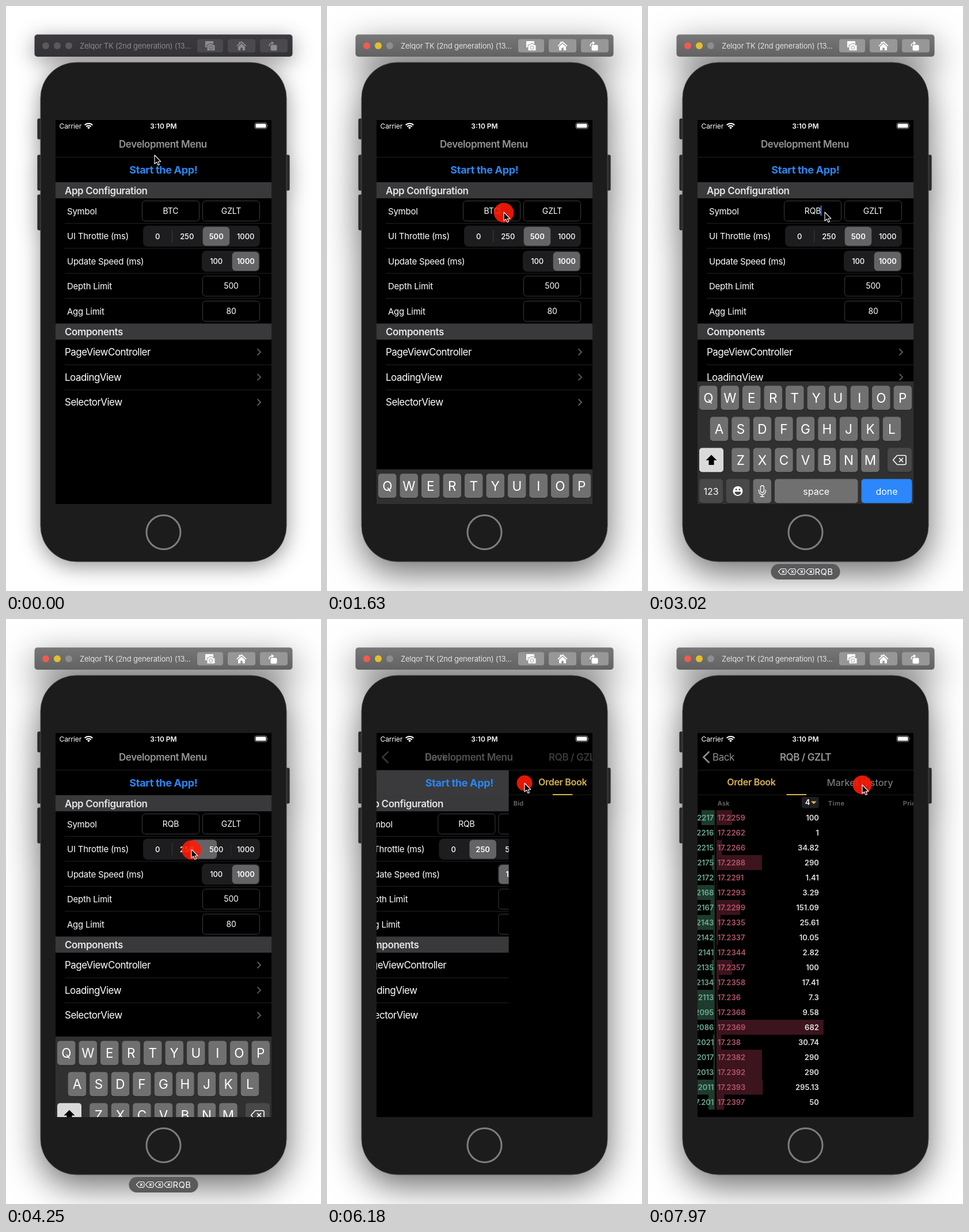
An HTML page for the animation above (8 s loop, 547 by 1016 pixels).

```html
<!DOCTYPE html>
<html lang="en">
<head>
<meta charset="utf-8">
<title>Development menu</title>
<style>
html, body { margin: 0; width: 100%; height: 100%; overflow: hidden; background: #fff; }
svg { display: block; }
#stage, #case { position: absolute; left: 0; top: 0; width: 547px; height: 1016px; }
text { font-family: Inter, Roboto, "Liberation Sans", sans-serif; white-space: pre; }
#case { --light1: #5b595c; --light2: #5b595c; --light3: #5b595c; --btn: #4b494d; --icon: #8d8c8e; --title: #8b8a8c; --bar: url(#barOff); }
#case .solid { filter: drop-shadow(0 8px 18px rgba(0,0,0,.42)); }
#case.on { --light1: #f15b51; --light2: #e3bf2f; --light3: #8d8d8d; --btn: #979797; --icon: #fff; --title: #e2e2e2; --bar: url(#barOn); }
#case.on .solid { filter: drop-shadow(0 19px 30px rgba(0,0,0,.58)); }
</style>
</head>
<body>
<svg id="case" viewBox="0 0 547 1016">
  <defs>
    <linearGradient id="barOff" x2="0" y2="1"><stop stop-color="#3c3a3f"/><stop offset="1" stop-color="#343237"/></linearGradient>
    <linearGradient id="barOn" x2="0" y2="1"><stop stop-color="#777"/><stop offset="1" stop-color="#626262"/></linearGradient>
  </defs>
  <g class="solid">
    <rect x="49.5" y="49.5" width="448" height="38.5" rx="5" style="fill:var(--bar)"/>
    <g fill="#2b2b2b" stroke="#1a1a1a">
      <rect x="55" y="196" width="9" height="35" rx="1.5"/>
      <rect x="55" y="259" width="9" height="61" rx="1.5"/>
      <rect x="55" y="328" width="9" height="61" rx="1.5"/>
      <rect x="483" y="259" width="9" height="61" rx="1.5"/>
    </g>
    <rect x="60" y="98" width="427" height="867" rx="62" fill="#1c1c1c" stroke="#484848"/>
  </g>
  <circle cx="273.5" cy="914" r="29.5" fill="none" stroke="#7d7d7d" stroke-width="3"/>
  <circle cx="69" cy="69" r="6" style="fill:var(--light1)"/>
  <circle cx="89" cy="69" r="6" style="fill:var(--light2)"/>
  <circle cx="109" cy="69" r="6" style="fill:var(--light3)"/>
  <text x="128" y="74" font-size="13" letter-spacing="-.2" style="fill:var(--title)">Zelqor TK (2nd generation) (13...</text>
  <g style="fill:var(--btn)">
    <rect x="332" y="57.5" width="45" height="23" rx="4"/>
    <rect x="385" y="57.5" width="48" height="23" rx="4"/>
    <rect x="441" y="57.5" width="48" height="23" rx="4"/>
  </g>
  <g style="fill:var(--icon);stroke:var(--btn)">
    <rect x="345.5" y="60.5" width="15" height="12" rx="1.5"/>
    <path d="M349 67.5h3l1.2-2h5l1.2 2h3.6v10.2h-14z"/>
    <circle cx="355.8" cy="72.3" r="3"/>
  </g>
  <g style="fill:var(--icon)">
    <path d="M409 61l8.5 8-1.2 1.3-7.3-6.8-7.3 6.8-1.2-1.3 4-3.8v-3h2v1.2z"/>
    <path d="M409 65.2l6 5.5V77h-4.2v-4.5h-3.6V77H403v-6.300z"/>
    <rect x="459.500" y="67.500" width="11" height="10" rx="2"/>
    <path d="M461 61l4.500 3.300-4.500 3.300z"/>
    <path d="M457 70c0-4 1.500-5.700 5-5.700" style="fill:none;stroke:var(--icon);stroke-width:1.600"/>
  </g>
</svg>
<svg id="stage" viewBox="0 0 547 1016"></svg>
<script>
const LOOP = 8000;
const COIN = 'RQB', CASH = 'GZLT';
const stage = document.getElementById('stage');
const shell = document.getElementById('case');

function add(parent, tag, attrs = {}) {
  const el = document.createElementNS('http://www.w3.org/2000/svg', tag);
  for (const k in attrs) el.setAttribute(k, attrs[k]);
  parent.appendChild(el);
  return el;
}
const group = (p, attrs) => add(p, 'g', attrs);
const path = (p, d, attrs) => add(p, 'path', { d, ...attrs });
const box = (p, x, y, width, height, fill, rx = 0, more) =>
  add(p, 'rect', { x, y, width, height, fill, rx, ...more });
// cy is the middle of the capitals
function label(p, x, cy, str, size, o = {}) {
  const el = add(p, 'text', {
    x, y: cy + size * 0.364, 'font-size': size, fill: o.fill || '#fff',
    'font-weight': o.weight || 400, 'text-anchor': o.anchor || 'start',
    'letter-spacing': o.ls || 0
  });
  el.textContent = str;
  return el;
}
const mid = { anchor: 'middle' };
const move = (el, x, y) => el.setAttribute('transform', `translate(${x} ${y})`);
const fade = (el, v) => el.setAttribute('opacity', v);
const show = (el, on) => el.setAttribute('visibility', on ? 'visible' : 'hidden');
const smooth = u => u * u * (3 - 2 * u);
const mix = (a, b, u) => a + (b - a) * u;

// value at t in a table of [time, value]
function at(t, rows, ease = u => u) {
  if (t <= rows[0][0]) return rows[0][1];
  for (let i = 1; i < rows.length; i++) {
    const [t0, a] = rows[i - 1], [t1, b] = rows[i];
    if (t < t1) return mix(a, b, ease((t - t0) / (t1 - t0)));
  }
  return rows[rows.length - 1][1];
}

const screen = add(stage, 'svg', { x: 86, y: 198, width: 375, height: 667, viewBox: '86 198 375 667' });
box(screen, 86, 198, 375, 667, '#000');

// ---- menu page
const menu = group(screen);
const line = (p, x, y, w = 461 - x, c = '#242426') => box(p, x, y, w, 1, c);
const press = box(menu, 86, 263, 375, 43, '#3a3a3c');
label(menu, 273.5, 284.5, 'Start the App!', 18, { ...mid, weight: 700, fill: '#2b87f3', ls: -0.3 });
for (const [y, s] of [[306, 'App Configuration'], [551.5, 'Components']]) {
  box(menu, 86, y, 375, 28, '#39393b');
  label(menu, 102, y + 14.5, s, 17, { weight: 600, fill: '#e4e4e6', ls: -0.43 });
}
['Symbol', 'UI Throttle (ms)', 'Update Speed (ms)', 'Depth Limit', 'Agg Limit'].forEach((s, i) => {
  label(menu, 106, 356.3 + i * 43.5, s, 15, { ls: -0.24 });
  if (i) line(menu, 102, 333.5 + i * 43.4);
});
['PageViewController', 'LoadingView', 'SelectorView'].forEach((s, i) => {
  const y = 601 + i * 43.6;
  label(menu, 102, y, s, 17, { ls: -0.53 });
  path(menu, `M436.500 ${y - 5.5}l5.500 5.500-5.500 5.500`, { fill: 'none', stroke: '#5a5a5e', 'stroke-width': 2 });
  if (i) line(menu, 102, y - 22);
});
function field(x, y, s) {
  box(menu, x + .5, y + .5, 99, 35, '#000', 5, { stroke: '#3c3c3f' });
  return label(menu, x + 50, y + 17.7, s, 14, { ...mid, ls: -0.15 });
}
const coin = field(236, 338, 'BTC');
field(341, 338, CASH);
field(341, 468.5, '500');
field(341, 512, '80');
const caret = box(menu, 0, 346.5, 2, 18, '#3478e5', 1);

function segments(x, y, names) {
  box(menu, x, y, 441 - x, 36.5, '#1d1d1f', 8);
  const rules = names.slice(1).map((_, i) => box(menu, x + 50.2 + i * 51, y + 7.5, 1, 21.5, '#414144'));
  const thumb = box(menu, 0, y + 2, 46.5, 33, '#646467', 6);
  const texts = names.map((s, i) => label(menu, x + 25.2 + i * 51, y + 18.5, s, 13, { ...mid, ls: -0.05 }));
  const pick = n => texts.forEach((el, i) => el.setAttribute('font-weight', i === n ? 600 : 500));
  return { rules, thumb, pick };
}
const throttle = segments(238, 381.5, ['0', '250', '500', '1000']);
const speed = segments(340, 425, ['100', '1000']);
show(throttle.rules[1], false);
show(speed.rules[0], false);

// ---- market page, laid out from its own left edge
const market = group(screen);
box(market, 0, 263, 375, 602, '#000');
const pages = group(add(market, 'svg', { x: 0, y: 306, width: 375, height: 559, viewBox: '0 306 375 559' }));
const head = { weight: 600, fill: '#6c6c6f', ls: 0.25 };
label(pages, 8, 319.5, 'Bid', 11, head);
label(pages, 191, 319.5, 'Ask', 11, head);
label(pages, 383, 319.5, 'Time', 11, { ...head, ls: 0.5 });
label(pages, 513, 319.5, 'Price', 11, head);
box(pages, 337, 309, 30, 19.5, '#1f1f21', 4);
label(pages, 343, 318.7, '4', 13, { weight: 600 });
path(pages, 'M353 316.500h10l-5 5z', { fill: '#d9b34c' });

const book = group(pages);
const bids = `2217 84.3 2216 1.2 2215 2.5 2175 18.4 2172 2.1 2168 290 2167 26.5 2143 143 2142 7.5 2141 7.2
 2135 19 2134 11 2113 203 2095 290 2086 1.5 2021 11.4 2017 7 2013 8.2 2011 290 201 40`.split(/\s+/);
const asks = `2259 100 2262 1 2266 34.82 2288 290 2291 1.41 2293 3.29 2299 151.09 2335 25.61 2337 10.05 2344 2.82
 2357 100 2358 17.41 236 7.3 2368 9.58 2369 682 238 30.74 2382 290 2392 290 2393 295.13 2397 50`.split(/\s+/);
for (let i = 0; i < 20; i++) {
  const y = 332 + i * 26, cy = y + 13;
  const [bp, bq] = bids.slice(i * 2), [ap, aq] = asks.slice(i * 2);
  const bw = Math.max(1, bq / 682 * 186), aw = Math.max(1, aq / 682 * 186);
  box(book, 186 - bw, y, bw, 26, '#1d3b2e');
  box(book, 189, y, aw, 26, '#3c141d');
  label(book, 8, cy, bq, 13, { weight: 600, fill: '#e2e2e2' });
  label(book, 184.5, cy, '17.' + bp, 13, { weight: 600, fill: '#6fae91', anchor: 'end' });
  label(book, 191, cy, '17.' + ap, 13, { weight: 600, fill: '#b4566a' });
  label(book, 367, cy, aq, 13, { weight: 600, fill: '#e2e2e2', anchor: 'end' });
}
const spokes = Array.from({ length: 8 }, (_, i) => box(pages, 186.2, 576, 2.6, 6.2, '#a0a0a4', 1.3,
  { transform: `rotate(${i * 45} 187.500 586)` }));
label(market, 93.5, 283, 'Order Book', 16, { ...mid, weight: 600, fill: '#dab54f', ls: -0.3 });
label(market, 282, 283.5, 'Market History', 16.5, { ...mid, weight: 500, fill: '#77777a', ls: -0.1 });
line(market, 0, 305, 375, '#1b1b1d');
const marker = box(market, 76, 304, 35, 2, '#dab54f', 1);

// ---- navigation and status bars
box(screen, 86, 198, 375, 64, '#000');
line(screen, 86, 262, 375, '#1e1e20');
const navTitle = { weight: 600, fill: '#949496', ls: -0.43 };
const oldTitle = label(screen, 196, 240, 'Development Menu', 17, navTitle);
const newTitle = label(screen, 273.5, 240, `${COIN} / ${CASH}`, 17, { ...navTitle, ...mid });
const backText = label(screen, 0, 240, 'Back', 17, { fill: '#8c8c8f', ls: -0.43 });
const backMark = path(screen, 'M105.500 231l-9 9 9 9', { fill: 'none', stroke: '#8c8c8f', 'stroke-width': 2.8, 'stroke-linecap': 'round' });
label(screen, 92.5, 208.500, 'Carrier', 12, { ls: -0.08 });
label(screen, 273.5, 208.5, '3:10 PM', 12, { ...mid, weight: 600 });
const wifi = group(screen, { fill: 'none', stroke: '#fff', 'stroke-width': 2 });
path(wifi, 'M136.700 206.800a9.500 9.500 0 0 1 13.600 0M139.200 209.500a6 6 0 0 1 8.600 0');
path(wifi, 'M143.500 213.800l-2.400-2.500a3.400 3.400 0 0 1 4.800 0z', { fill: '#fff', stroke: 'none' });
box(screen, 432, 203, 21, 10, 'none', 3, { stroke: '#8a8a8a' });
box(screen, 433.5, 204.500, 18, 7, '#fff', 1.6);
path(screen, 'M454.500 206.200q1.600 1.800 0 3.600z', { fill: '#8a8a8a' });

// ---- keyboard, laid out from its top edge
const keys = group(screen);
box(keys, 86, 0, 375, 216, '#303030');
function key(x, row, w, fill, s, size = 22.5, ink = '#fff') {
  const y = 7.5 + row * 54;
  box(keys, x, y + 1, w, 42, '#1a1a1a', 5);
  box(keys, x, y, w, 42, fill, 5);
  if (s) label(keys, x + w / 2, y + 21.3, s, size, { ...mid, fill: ink });
}
const LIGHT = '#707070', DARK = '#484848';
[['QWERTYUIOP', 89], ['ASDFGHJKL', 107.7], ['ZXCVBNM', 145.2]].forEach(([s, x], row) =>
  [...s].forEach((c, i) => key(x + i * 37.5, row, 31.5, LIGHT, c)));
key(89, 2, 42, '#dadada');
path(keys, 'M110 127.500l9.500 9.500h-5v8h-9v-8h-5z', { fill: '#000', 'stroke-linejoin': 'round' });
key(416, 2, 42, DARK);
const erase = (p, x, y, k, w) => path(p, 'M0 8L6.500 .8Q7 0 8.500 0H20Q22.500 0 22.500 2.500V13.500Q22.500 16 20 16H8.500Q7 16 6.500 15.200ZM10.500 4.500l7 7m0-7l-7 7',
  { fill: 'none', stroke: '#fff', 'stroke-width': w, 'stroke-linejoin': 'round', transform: `translate(${x} ${y}) scale(${k})` });
erase(keys, 425.5, 128.500, 1, 1.6);
key(89, 3, 41, DARK, '123', 16);
key(135.5, 3, 41, DARK);
add(keys, 'circle', { cx: 156, cy: 190.5, r: 8.5, fill: '#fff' });
path(keys, 'M150.500 191.500h11a5.500 5.500 0 0 1-11 0zM152 186.500h2.400v2.600H152zM157.600 186.500h2.400v2.600h-2.400z', { fill: DARK });
key(182.5, 3, 31.5, LIGHT);
const mic = group(keys, { fill: 'none', stroke: '#fff', 'stroke-width': 1.3 });
box(mic, 195.4, 181, 6, 12, 'none', 3);
path(mic, 'M192.500 188v2.500a5.900 5.900 0 0 0 11.800 0V188M198.400 196.500v3.500M195 200h6.800');
key(220, 3, 144.5, LIGHT, 'space', 16);
key(370.5, 3, 88, '#2b87fb', 'done', 16);

// ---- typed keys bubble
const bubble = group(stage);
const bubbleBack = box(bubble, 0, 969, 0, 27, '#5a5a5c', 13.5);
const erased = [0, 1, 2, 3].map(() => group(bubble));
erased.forEach(g => erase(g, 0, 977.5, 0.6, 1.9));
const typed = label(bubble, 0, 982.700, '', 15, { ls: 0.4 });

// ---- pointer
const dot = add(stage, 'circle', { r: 0, fill: 'rgb(255,26,6)', 'fill-opacity': 0.89 });
const pointer = path(stage, 'M0 0V15.200L3.600 12L6 17.600L8.500 16.500L6.100 11.200H10.800Z',
  { fill: '#000', stroke: '#fff', 'stroke-width': 1.1, 'stroke-linejoin': 'round' });

// pointer stops: time, x, y
const trail = [[620, 258, 259], [1220, 307, 358], [3520, 307, 358], [3980, 322, 400], [4470, 322, 400],
  [4830, 362, 437], [5190, 362, 437], [5670, 343, 285], [6800, 343, 285], [7500, 372, 288]];
const swing = [[5190, 362, 437], [5250, 357, 418], [5400, 350, 345], [5550, 344, 294], [5670, 343, 285]];
// clicks: down, up, x, y
const clicks = [[1470, 1580, 307, 359], [4100, 4190, 322, 401], [4850, 4970, 362, 437],
  [5920, 6040, 343, 285], [7770, 7900, 372, 288]];
const strokes = [2120, 2200, 2330, 2450, 2770, 2900, 3020];
const slide = [[1590, 866], [1630, 806], [1690, 730], [1760, 682], [1830, 660], [1900, 652],
  [4190, 652], [4250, 724], [4310, 795], [4370, 840], [4430, 858], [4490, 866]];
const push = [[6090, 0], [6180, .384], [6240, .6], [6310, .79], [6400, .92], [6520, .985], [6660, 1]];

function drawPointer(t) {
  const quick = t > 5190 && t < 5670;
  const rows = quick ? swing : trail, ease = quick ? undefined : smooth;
  move(pointer, at(t, rows.map(r => [r[0], r[1]]), ease), at(t, rows.map(r => [r[0], r[2]]), ease));
  const hit = clicks.find(c => t >= c[0] && t < c[1] + 470);
  show(dot, !!hit);
  if (!hit) return;
  const [down, up, x, y] = hit;
  dot.setAttribute('cx', x);
  dot.setAttribute('cy', y);
  dot.setAttribute('r', at(t, [[down, 3], [down + 90, 17.2], [up + 50, 17.2], [up + 470, 0]]));
}

function drawTyping(t) {
  const n = strokes.filter(s => t >= s).length;
  const cuts = Math.min(n, 4), word = COIN.slice(0, Math.max(0, n - 4));
  const text = n < 5 ? 'BTC'.slice(0, Math.max(0, 3 - n)) : word;
  if (coin.textContent !== text) coin.textContent = text;
  if (typed.textContent !== word) typed.textContent = word;
  caret.setAttribute('x', 286 + (text ? coin.getComputedTextLength() / 2 : 0) - 0.7);
  show(caret, t >= 1600 && t < 4190);

  show(bubble, n > 0 && t < 4850);
  fade(bubble, at(t, [[4650, 1], [4850, 0]]));
  const w = 24 + cuts * 16 + (word ? typed.getComputedTextLength() : 0), x = 273.5 - w / 2;
  bubbleBack.setAttribute('x', x);
  bubbleBack.setAttribute('width', w);
  erased.forEach((g, i) => { move(g, x + 13 + i * 16, 0); fade(g, i < cuts ? 1 : 0); });
  typed.setAttribute('x', x + 12 + cuts * 16);
}

function drawPush(t) {
  const p = at(t, push);
  move(menu, -112.5 * p, 0);
  show(menu, p < 1);
  show(press, t >= 6040);
  move(market, 86 + 375 * (1 - p), 0);
  oldTitle.setAttribute('x', mix(196, 128, p));
  newTitle.setAttribute('x', 273.5 + 255 * (1 - p));
  backText.setAttribute('x', mix(208, 112, p));
  fade(oldTitle, Math.max(0, 1 - p * 1.15));
  for (const el of [newTitle, backText, backMark]) fade(el, p);

  const loaded = t >= 7650, beat = Math.floor(t / 62);
  show(book, loaded);
  spokes.forEach((el, i) => {
    show(el, !loaded);
    fade(el, 1 - 0.11 * ((beat - i) % 8));
  });
  const s = at(t, [[7840, 0], [8135, 1]], smooth);
  move(pages, -375 * s, 0);
  marker.setAttribute('x', 76 + 188 * s);
}

function draw(t) {
  shell.classList.toggle('on', t >= 120);
  move(keys, 0, at(t, slide));
  throttle.thumb.setAttribute('x', at(t, [[4180, 341.700], [4250, 320], [4310, 302], [4380, 293], [4440, 291]]));
  throttle.pick(t < 4200 ? 2 : 1);
  fade(throttle.rules[0], at(t, [[4230, 1], [4400, 0]]));
  fade(throttle.rules[2], at(t, [[4200, 0], [4320, 1]]));
  speed.thumb.setAttribute('x', at(t, [[4960, 392.700], [5030, 371], [5090, 353], [5150, 344], [5210, 341.800]]));
  speed.pick(t < 4980 ? 1 : 0);
  drawTyping(t);
  drawPush(t);
  drawPointer(t);
}

const start = performance.now();
function tick() {
  draw((performance.now() - start) % LOOP);
  requestAnimationFrame(tick);
}
tick();
</script>
</body>
</html>
```
